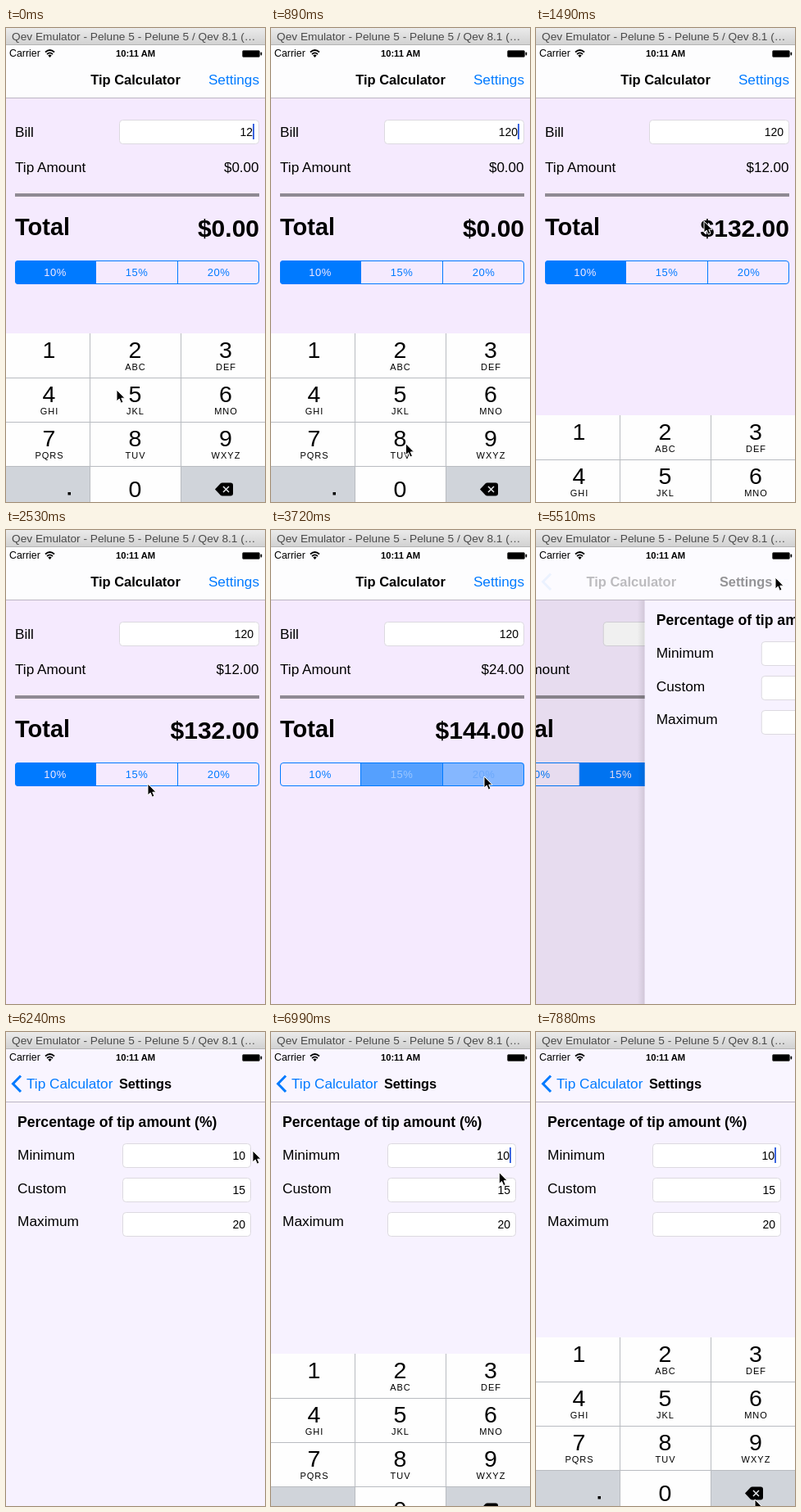
An HTML page that plays this animation: 316x579 px, repeating every 8 s.

```html
<!DOCTYPE html>
<html lang="en">
<head>
<meta charset="utf-8">
<title>Tip Calculator</title>
<style>
  html, body { margin: 0; width: 100%; height: 100%; overflow: hidden; background: #f5eafe; }
  svg { display: block; font-family: "Liberation Sans", Arial, sans-serif; }
</style>
</head>
<body>
<svg id="stage" width="316" height="579" viewBox="0 0 316 579"></svg>
<script>
const LOOP = 8000, STEP = 148.6, LEAD = 5;
const BLUE = '#007aff', MAIN_BG = '#f5eafe', SETTINGS_BG = '#f7f2ff';
const stage = document.getElementById('stage');

// Keyframes: [step, ...values]
const CURSOR = [
  [0, 135, 442], [3, 157, 558], [5, 157, 558], [9, 205, 236], [12, 205, 236],
  [16, 172, 318], [17, 173, 310], [18, 172, 309], [20, 172, 318], [21, 172, 318],
  [24, 259, 302], [25, 260, 301], [26, 260, 301], [28, 166, 303], [30, 166, 303],
  [35, 292, 58], [38, 292, 58], [42, 301, 145], [44, 279, 148], [46, 279, 148], [53, 267, 571]
];
const KEYBOARD_DROP = [
  [8, 0], [9, 8], [10, 100], [11, 200], [12, 216],
  [45, 216], [46, 130], [47, 20], [48, 0]
];
const SELECTIONS = [[0, 0], [18, 1], [25, 2], [29, 1]];
const RATES = [10, 15, 20];

function track(keys, step) {
  const next = keys.findIndex(k => k[0] > step);
  if (next === 0) return keys[0].slice(1);
  if (next < 0) return keys.at(-1).slice(1);
  const a = keys[next - 1], b = keys[next];
  const u = (step - a[0]) / (b[0] - a[0]), eased = u * u * (3 - 2 * u);
  return a.slice(1).map((v, i) => v + (b[i + 1] - v) * eased);
}

const rect = (x, y, w, h, fill, extra = '') =>
  `<rect x="${x}" y="${y}" width="${w}" height="${h}" fill="${fill}" ${extra}/>`;
const text = (x, y, size, str, extra = '') =>
  `<text x="${x}" y="${y}" font-size="${size}" ${extra}>${str}</text>`;
const group = (x, y, content, extra = '') =>
  `<g transform="translate(${x} ${y})" ${extra}>${content}</g>`;
const line = (d, color, width = 1, extra = '') =>
  `<path d="${d}" fill="none" stroke="${color}" stroke-width="${width}" ${extra}/>`;

const BOLD = 'font-weight="700"', END = 'text-anchor="end"', MIDDLE = 'text-anchor="middle"';

function field(x, y, w, value, focused) {
  const right = x + w - (focused ? 8 : 7);
  return rect(x + .5, y + .5, w - 1, 29, '#fff', 'rx="4" stroke="#dcd9e0"') +
    text(right, y + 20, 14, value, END) +
    (focused ? rect(right, y + 5, 2, 19, '#3d66e0') : '');
}

function segments(step) {
  const index = SELECTIONS.findLastIndex(s => s[0] <= step);
  const [start, selected] = SELECTIONS[index];
  const fading = index > 0 && step === start;
  const previous = fading ? SELECTIONS[index - 1][1] : -1;
  const edges = [11, 109.5, 209.5, 309];
  let fills = '', labels = '';
  RATES.forEach((rate, i) => {
    const on = i === selected, was = i === previous;
    const opacity = on ? (fading ? .46 : 1) : was ? .65 : 0;
    const color = was ? '#9dc8ff' : on ? (fading ? '#6ba8fb' : MAIN_BG) : BLUE;
    fills += rect(edges[i], 284, edges[i + 1] - edges[i], 29, BLUE, `opacity="${opacity}"`);
    labels += text([60, 159.5, 259.5][i], 303, 13, rate + '%', `${MIDDLE} fill="${color}" letter-spacing=".5"`);
  });
  return `<clipPath id="pill"><rect x="11" y="284" width="298" height="29" rx="4"/></clipPath>` +
    `<g clip-path="url(#pill)">${fills}</g>` +
    rect(11.5, 284.5, 297, 28, 'none', `rx="3.5" stroke="${BLUE}"`) +
    line('M109.5 284V313M209.5 284V313', BLUE) + labels;
}

function calculator(step) {
  const bill = step < 4 ? '12' : '120';
  const rate = RATES[SELECTIONS.findLast(s => s[0] <= step)[1]];
  const tip = step < 9 ? 0 : bill * rate / 100;
  const total = step < 9 ? 0 : +bill + tip;
  const money = n => '$' + n.toFixed(2);
  return rect(0, 85, 316, 494, MAIN_BG) +
    text(11, 133, 17.2, 'Bill') + field(138, 112, 171, bill, step < 9) +
    text(11, 176, 17.2, 'Tip Amount') + text(308.5, 176, 17, money(tip), END) +
    rect(11, 202, 298, 4, '#8f8a93') +
    text(11, 252.5, 29, 'Total', BOLD) + text(309, 255, 30, money(total), `${BOLD} ${END}`) +
    segments(step);
}

function settings(step) {
  const rows = [['Minimum', 156, 136], ['Custom', 197, 178], ['Maximum', 236.5, 220]];
  return rect(0, 85, 316, 494, SETTINGS_BG) +
    text(14, 116, 17.6, 'Percentage of tip amount (%)', BOLD) +
    rows.map(([label, baseline, top], i) =>
      text(14, baseline, 17.3, label) + field(142, top, 157, RATES[i], i === 0 && step >= 46)).join('');
}

function navigation(push) {
  const backLabel = Math.max(0, (push - .6) / .4);
  return rect(0, 21, 316, 64, '#fdfdfe') +
    rect(0, 21, 316, 64, '#f9f5ff', `opacity="${push ** 2}"`) +
    rect(0, 85, 316, 1, '#bcb6c2') +
    text(158 - 72 * push, 69, 16.5, 'Tip Calculator', `${BOLD} ${MIDDLE} opacity="${(1 - push) * (1 - .7 * push)}"`) +
    text(309, 69, 17.2, 'Settings', `${END} fill="${BLUE}" opacity="${Math.max(0, 1 - 1.7 * push)}"`) +
    (push ? text(170 + 205 * (1 - push), 69, 16.3, 'Settings', `${BOLD} ${MIDDLE} opacity="${push * push * (1.5 - .5 * push)}"`) : '') +
    line('M18 53.5L8.5 63.2L18 73', BLUE, 3, `opacity="${push ** 5}"`) +
    text(25 + 88 * (1 - push), 69, 17.2, 'Tip Calculator', `fill="${BLUE}" opacity="${backLabel}"`);
}

function statusBar() {
  return text(4, 35, 12.4, 'Carrier') +
    line('M48 29.5Q53.5 24.5 59 29.5M50 32Q53.5 28.8 57 32', '#000', 1.7) +
    '<path d="M51.3 33.5Q53.5 31.6 55.7 33.5L53.5 36Z"/>' +
    text(158, 35, 11.2, '10:11 AM', `${BOLD} ${MIDDLE}`) +
    rect(288.5, 27.5, 21, 8, '#000', 'rx="1.5" stroke="#555"') + rect(310.5, 29.5, 1.7, 4, '#000', 'rx=".8"');
}

function titleBar() {
  return `<linearGradient id="chrome" x2="0" y2="1"><stop stop-color="#ebebeb"/><stop offset="1" stop-color="#d2d2d2"/></linearGradient>` +
    rect(0, 0, 316, 20, 'url(#chrome)') + rect(0, 20, 316, 1, '#b4b4b4') +
    text(7, 15, 13.7, 'Qev Emulator - Pelune 5 - Pelune 5 / Qev 8.1 (…', 'fill="#4a4a4a"');
}

function keyboard(pressed) {
  const letters = ['', 'ABC', 'DEF', 'GHI', 'JKL', 'MNO', 'PQRS', 'TUV', 'WXYZ'];
  const centers = [52.5, 157.5, 268], gray = '#d0d4da';
  const digits = letters.map((sub, i) => {
    const x = centers[i % 3], y = 54 * Math.floor(i / 3);
    return text(x, y + 29.5, 28.5, i + 1, MIDDLE) +
      text(x + .5, y + 45, 11, sub, `${MIDDLE} letter-spacing="1"`);
  }).join('');
  return rect(0, 0, 316, 216, '#fefefe') +
    rect(0, 162, 102, 54, gray) + rect(214, 162, 102, 54, gray) +
    (pressed ? rect(103, 162, 110, 54, gray) : '') +
    line('M0 54.5H316M0 108.5H316M0 162.5H316M102.5 0V216M213.5 0V216', '#b9bcc1') +
    digits + text(157.5, 199.5, 28.5, '0', MIDDLE) + rect(75.5, 194, 3.5, 3.5, '#000') +
    '<path d="M255 190.5L261.5 183.5Q262.5 182.5 264 182.5H274Q277 182.5 277 185.5V195.5Q277 198.5 274 198.5H264Q262.5 198.5 261.5 197.5Z"/>' +
    line('M265 187L272 194M272 187L265 194', '#e4e7ea', 1.5);
}

const pointer = '<path d="M0 0V14L3.2 11L5.4 16.2L8 15.1L5.8 10.2H10Z" stroke="#fff" stroke-width="1" stroke-linejoin="round"/>';

function render(step) {
  const push = step < 37 ? 0 : step > 39 ? 1 : 1 - .42 ** ((step - 36) ** 1.5);
  const edge = 316 * (1 - push);
  const [drop] = track(KEYBOARD_DROP, step);
  const [x, y] = track(CURSOR, step);
  let picture = '';
  if (push < 1) picture += group(-97 * push, 0, calculator(step));
  if (push > 0) {
    picture += rect(0, 85, edge, 494, '#000', `opacity="${.1 * push}"`) +
      '<linearGradient id="shade"><stop stop-opacity="0"/><stop offset="1" stop-opacity=".1"/></linearGradient>' +
      rect(edge - 9, 85, 9, 494, 'url(#shade)') + group(edge, 0, settings(step));
  }
  picture += navigation(push) + statusBar() + titleBar();
  if (drop < 216) picture += group(0, 373 + drop, keyboard(step === 4 || step === 5));
  stage.innerHTML = picture + group(x, y, pointer);
}

let shown = -1;
const origin = performance.now();
function tick() {
  const time = (performance.now() - origin) % LOOP;
  const step = Math.min(53, Math.floor((time + LEAD) / STEP));
  if (step !== shown) render(shown = step);
  requestAnimationFrame(tick);
}
tick();
</script>
</body>
</html>
```
